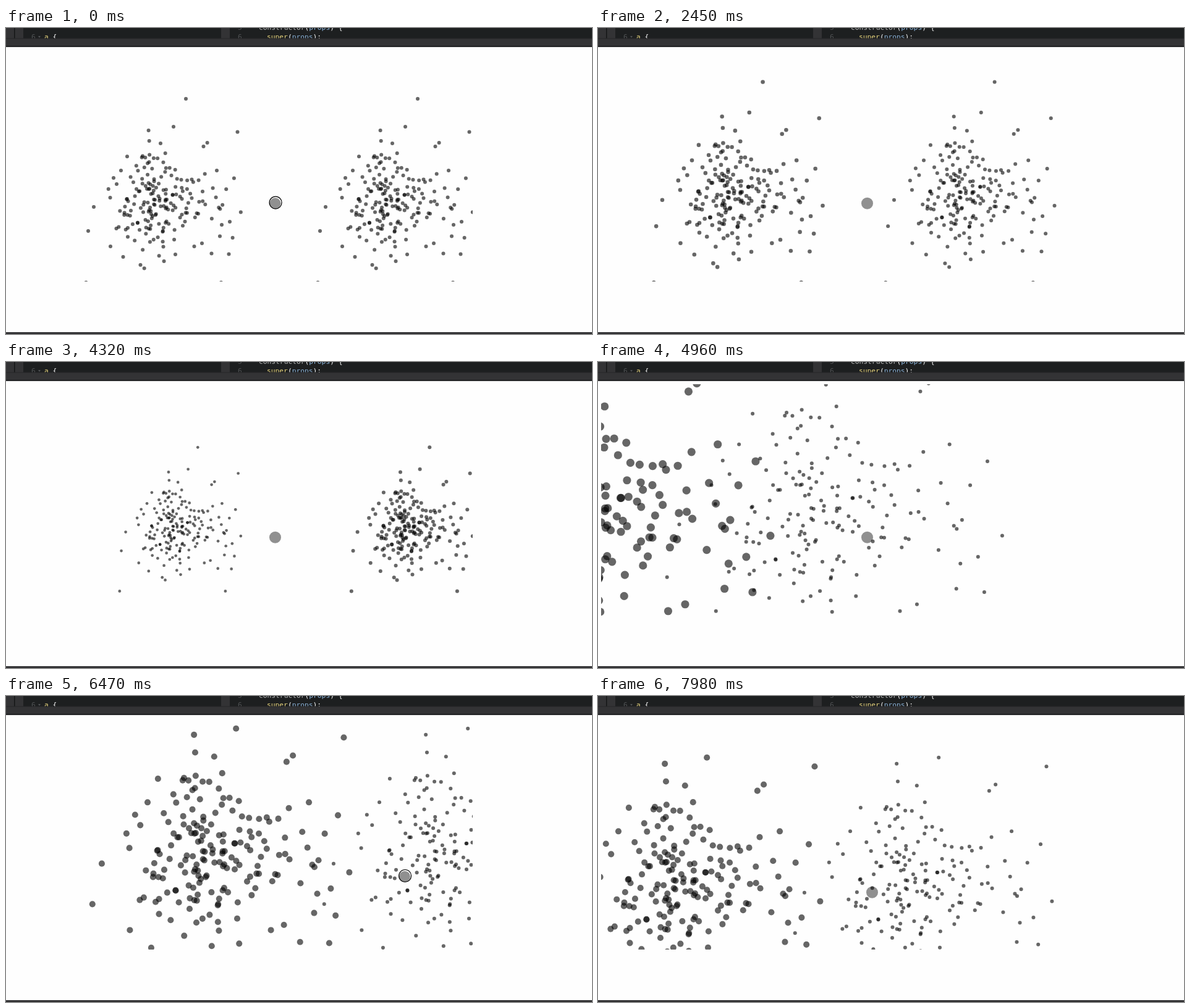
Recreate the animation shown at these times as an HTML page. Size 948x496 px, loop 8 s.

```html
<!DOCTYPE html>
<html lang="en">
<head>
<meta charset="utf-8">
<title>Zoomable scatterplots</title>
<style>
  html, body { margin: 0; width: 100%; height: 100%; overflow: hidden; background: #fefefe; }
  svg { display: block; }
  text { font: 11.25px "DejaVu Sans Mono", monospace; fill: #fff; white-space: pre; }
  .num { fill: #505254; }
  .key { fill: #e8d57e; }
  .arg { fill: #8ab2d8; }
  .dim { fill: #b4b6b6; }
</style>
</head>
<body>
<svg width="948" height="496" viewBox="0 0 948 496">
  <defs>
    <clipPath id="plot"><rect x="5" y="36" width="750" height="375"/></clipPath>
    <clipPath id="editor"><rect width="948" height="17"/></clipPath>
  </defs>
  <rect width="948" height="496" fill="#fefefe"/>
  <g clip-path="url(#editor)">
    <rect width="948" height="17" fill="#1d1f20"/>
    <rect width="28" height="17" fill="#333335"/>
    <rect x="13" width="1.5" height="17" fill="#151617"/>
    <rect x="348" width="14" height="17" fill="#333335"/>
    <text x="41" y="17.5" class="num">6</text>
    <path d="M52 13h4l-2 3z" fill="#505254"/>
    <text x="62" y="17.5" font-weight="bold"><tspan class="key">a</tspan> {</text>
    <text x="375" y="2.7" class="num">5</text>
    <text x="375" y="17.5" class="num">6</text>
    <text x="409" y="2.7"><tspan class="dim">constructor</tspan>(<tspan class="arg">props</tspan>) {</text>
    <text x="422" y="17.5"><tspan class="key">super</tspan>(<tspan class="arg">props</tspan>);</text>
  </g>
  <rect y="17" width="948" height="13.5" fill="#333335"/>
  <rect y="16.5" width="948" height="1" fill="#262729"/>
  <rect y="29" width="948" height="1.7" fill="#17181a"/>
  <rect y="493" width="948" height="3" fill="#333335"/>
  <g clip-path="url(#plot)" fill-opacity=".6">
    <g id="scaled"></g>
    <g id="fixed"></g>
  </g>
  <g id="cursor">
    <circle id="ring" cx=".6" cy="-1.2" r="10" fill="none" stroke="#000" stroke-width="1.2"/>
    <circle id="dot" r="9.5" fill-opacity=".43"/>
  </g>
</svg>
<script>
const LOOP = 8000, RADIUS = 3, GAP = 375;
const $ = id => document.getElementById(id);

// Sparse outer points and the right-hand side; the dense core is random.
const placed = [
  [321.7, 236.6], [276.7, 244.6], [283.5, 246], [293.1, 247], [300.5, 245.6], [302.9, 249.7],
  [311.6, 246.8], [274.2, 257.5], [284.3, 259.1], [292.9, 261.1], [285.9, 264.5], [334.6, 259.5],
  [318, 265], [298.1, 268.4], [275.3, 269.7], [281.6, 273.2], [284.6, 277.1], [300.5, 275.7],
  [339.6, 274.6], [294.9, 283.5], [312.4, 281.7], [318.2, 280.8], [322.3, 285.9], [291.7, 292.3],
  [274.2, 291.3], [344.2, 291.1], [346.3, 293.3], [350.2, 286.8], [356.2, 261.2], [368.9, 243.5],
  [379.8, 298.4], [290.7, 299.6], [292.9, 299.8], [308.6, 300.2], [311, 301], [284.5, 302.6],
  [281.6, 307.2], [305.8, 307], [332.9, 308.9],
  [291, 114.7], [271, 160], [230.6, 166], [231.7, 183], [374.5, 168.6], [250, 187],
  [325.6, 186], [319.5, 192], [257.7, 203], [196, 208.3], [221, 207.5], [186, 231],
  [174, 243], [179, 253], [165.7, 261], [142, 290], [133, 329], [129.5, 412.5],
  [348, 412.5], [341, 231], [362, 314], [366.6, 340], [360.5, 366.5], [332.5, 365.5],
  [346, 337.5], [169, 354], [189.5, 371], [217.5, 384], [223.7, 389.5], [178.5, 325],
  [196.5, 303], [317, 349], [304.5, 354], [274, 367], [349, 319]
];

let seed = 11;
const random = () => (seed = seed * 16807 % 2147483647) / 2147483647;
const normal = (mean, dev) =>
  mean + dev * Math.sqrt(-2 * Math.log(random())) * Math.cos(2 * Math.PI * random());

const points = placed.slice();
while (points.length < 198) {
  const x = normal(239, 33), y = normal(280, 48);
  const inCore = ((x - 245) / 80) ** 2 + ((y - 292) / 88) ** 2 < 1;
  const covered = x > 272 && y > 232 && y < 310;
  if (inCore && !covered) points.push([x, y]);
}

function addCircle(parent, [x, y]) {
  const c = document.createElementNS("http://www.w3.org/2000/svg", "circle");
  c.setAttribute("cx", x);
  c.setAttribute("cy", y);
  c.setAttribute("r", RADIUS);
  parent.appendChild(c);
  return c;
}
points.forEach(p => addCircle($("scaled"), p));
const fixedDots = points.map(p => addCircle($("fixed"), p));

const HOME = { x: 435.5, y: 284.3 };
const about = (cx, cy) => k => ({ k, x: cx * (1 - k), y: cy * (1 - k), cursor: HOME });
const zoomIn = about(435.7, 282.8), zoomOut = about(379.8, 223.4);
const view = (k, x, y, cursor = HOME) => ({ k, x, y, cursor });

// Each move: first step time, last step time, step count, resulting view.
const moves = [
  [270, 270, 1, zoomIn(1.01)],
  [410, 560, 4, zoomIn(1.78)],
  [790, 790, 1, zoomIn(1.8)],
  [1180, 1360, 4, zoomIn(4.97)],
  [1630, 1690, 2, zoomIn(4)],
  [1920, 2160, 4, zoomIn(1.46)],
  [2400, 2570, 4, zoomOut(0.456)],
  [2840, 3190, 7, zoomOut(0.298)],
  [3670, 3670, 1, zoomOut(0.2205)],
  [3700, 3700, 1, zoomOut(0.2)],
  [3910, 3970, 2, zoomOut(0.311)],
  [4120, 4320, 5, zoomOut(0.783)],
  [4550, 4960, 7, view(2.197, -555.5, -374)],
  [5400, 5460, 2, view(1.684, -323.8, -220.4)],
  [5700, 6470, 17, view(1.684, -84.2, -216.7, { x: 645, y: 292.7 })],
  [6530, 7250, 13, view(1.684, -140.2, -161.7, { x: 591, y: 330.5 })],
  [7310, 7980, 11, view(1.684, -280.2, -169.7, { x: 443.5, y: 318.3 })]
];

const mix = (a, b, u) => a + (b - a) * u;
const mixPoint = (a, b, u) => ({ x: mix(a.x, b.x, u), y: mix(a.y, b.y, u) });

function blend(a, b, u) {
  if (a.k === b.k) {
    const e = u * u * (3 - 2 * u);
    return { k: a.k, ...mixPoint(a, b, e), cursor: mixPoint(a.cursor, b.cursor, e) };
  }
  const k = a.k * (b.k / a.k) ** u;
  return { k, ...mixPoint(a, b, (k - a.k) / (b.k - a.k)), cursor: b.cursor };
}

function viewAt(t) {
  let current = zoomIn(1);
  for (const [start, end, steps, next] of moves) {
    if (t < start) break;
    if (t >= end) { current = next; continue; }
    const done = 1 + Math.floor((t - start) / (end - start) * (steps - 1) + 1e-6);
    return blend(current, next, done / steps);
  }
  return current;
}

function draw(t) {
  const { k, x, y, cursor } = viewAt(t);
  $("scaled").setAttribute("transform", `translate(${x} ${y}) scale(${k})`);
  fixedDots.forEach((dot, i) => {
    dot.setAttribute("cx", GAP + x + k * points[i][0]);
    dot.setAttribute("cy", y + k * points[i][1]);
  });
  const pressed = t < 30 || (t >= 5700 && t < 7980);
  $("cursor").setAttribute("transform", `translate(${cursor.x} ${cursor.y})`);
  $("ring").setAttribute("visibility", pressed ? "visible" : "hidden");
  $("dot").setAttribute("r", pressed ? 9 : 9.5);
}

const begin = performance.now();
function tick() {
  draw((performance.now() - begin) % LOOP);
  requestAnimationFrame(tick);
}
tick();
</script>
</body>
</html>
```
